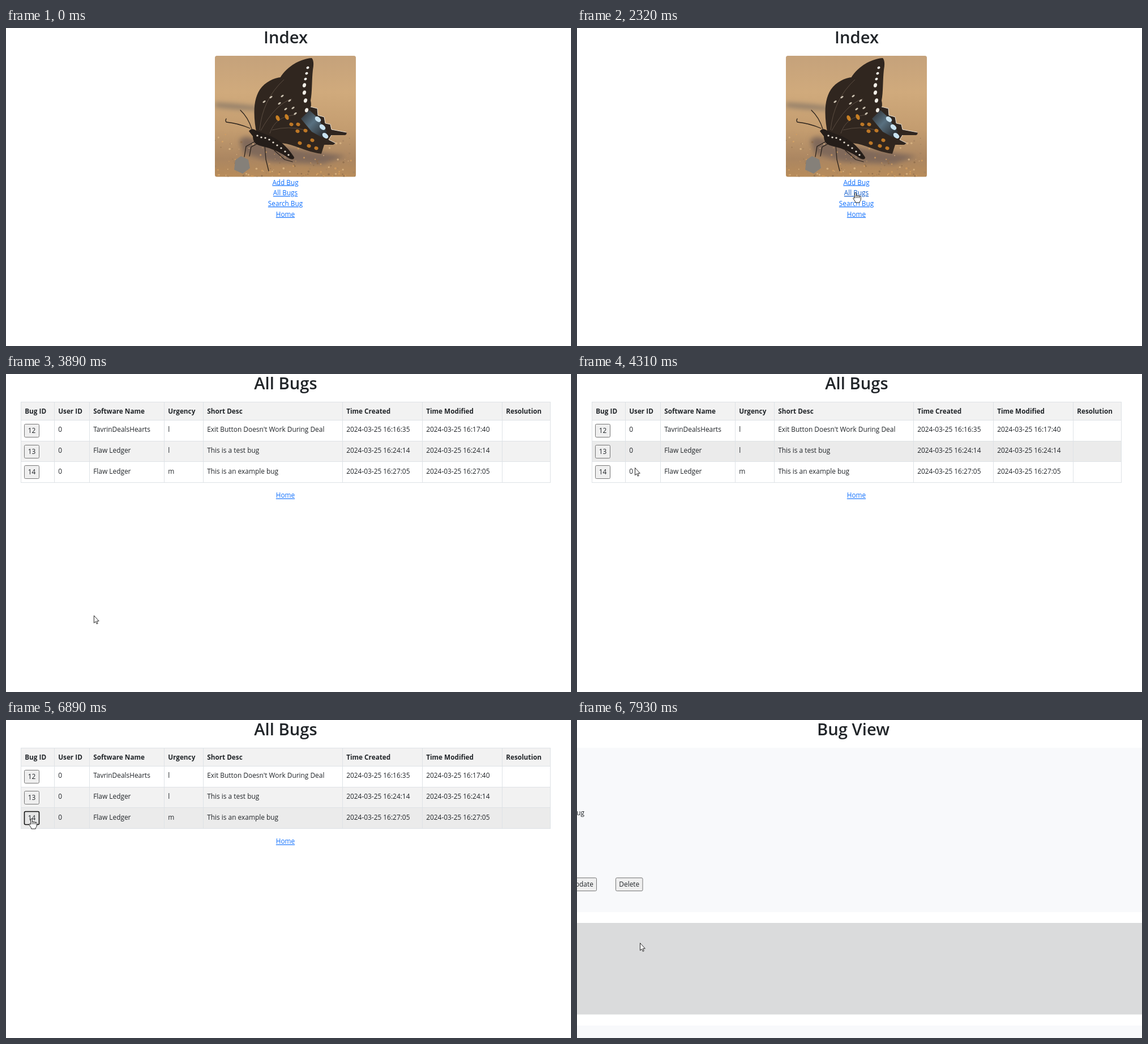
An HTML page that plays this animation: 998 px wide and 561 px high, repeating every 8 s.

```html
<!DOCTYPE html>
<html lang="en">
<head>
<meta charset="utf-8">
<title>Bug list</title>
<style>
html, body { margin: 0; width: 100%; height: 100%; overflow: hidden; background: #fff; }
svg { display: block; width: 100%; height: 100%; }
text { font: 11.9px "Open Sans", "Noto Sans", sans-serif; fill: #212529; }
.h1 { font-size: 29.2px; font-weight: 600; text-anchor: middle; }
.th { font-size: 11.75px; font-weight: 700; }
.mid { text-anchor: middle; }
.end { text-anchor: end; }
.link { font-size: 11.75px; text-anchor: middle; fill: #0d6efd; text-decoration: underline; }
.link.over { fill: #0a58ca; }
.btn { fill: #efefef; stroke: #767676; }
.btn.over { fill: #e5e5e5; stroke: #4f4f4f; }
.btn.down { stroke: #101010; stroke-width: 1.6; }
.cursor path { fill: #fff; stroke: #111; stroke-width: .9; stroke-linejoin: round; }
.wing { fill: #30261f; }
</style>
</head>
<body>
<svg id="stage" viewBox="0 0 998 561">
  <defs>
    <linearGradient id="sand" x2="0" y2="1">
      <stop offset="0" stop-color="#c5a27b"/>
      <stop offset=".3" stop-color="#d0aa7c"/>
      <stop offset=".62" stop-color="#c39c6f"/>
      <stop offset=".85" stop-color="#ab8661"/>
      <stop offset="1" stop-color="#b88c5a"/>
    </linearGradient>
    <linearGradient id="blue" x2="1" y2="1">
      <stop offset="0" stop-color="#2b2a2b"/>
      <stop offset=".45" stop-color="#587080"/>
      <stop offset="1" stop-color="#201d1d"/>
    </linearGradient>
    <clipPath id="frame"><rect x="369" y="49" width="249" height="213.5" rx="3.5"/></clipPath>
    <filter id="soft" x="-30%" y="-60%" width="160%" height="220%"><feGaussianBlur stdDeviation="4"/></filter>
  </defs>

  <g class="page" id="index">
    <g clip-path="url(#frame)">
      <rect x="369" y="49" width="249" height="214" fill="url(#sand)"/>
      <g filter="url(#soft)">
        <path d="M369 132Q410 134 445 139V145Q400 143 369 139Z" fill="#8c7a68"/>
        <path d="M412 198Q425 185 445 200L520 215 600 226 560 240 470 236 420 222Z" fill="#80695a"/>
      </g>
      <g id="grains"></g>
      <path d="M403 250L405 233 415 226 428 232 431 247 418 257Z" fill="#858079"/>
      <g fill="none" stroke="#2a221c" stroke-width="1.3" stroke-linecap="round">
        <path d="M434 178Q428 158 414 145M431 177Q410 168 389 166Q387 163 389 160"/>
        <path d="M440 200L424 209 421 227M444 204L433 210 430 226M457 206L459 232 464 252M474 216L492 232 506 236"/>
      </g>
      <path class="wing" d="M484 88C497 66 522 54 540 53Q545 58 542 74C540 92 541 114 538 128Q541 140 534 152L508 160Z"/>
      <path class="wing" d="M443 188C436 154 436 122 452 104C466 89 484 85 497 87C503 112 513 140 522 158L500 180 466 196Z" fill="#3a2f27"/>
      <path class="wing" d="M458 186C466 162 490 148 516 152L538 139 550 142 551 154 562 157 564 168 573 170 575 179 601 184Q603 187 599 189L575 189 570 197 582 203 578 206 562 206 557 222C530 219 505 203 484 203Z"/>
      <path d="M521 160L536 145 548 156 567 183 560 194 540 183Z" fill="url(#blue)"/>
      <path d="M538 139L550 142 551 154 562 157 564 168 573 170 575 179 601 184M575 189L570 197 582 203" fill="none" stroke="#e9e0d3" stroke-width="1"/>
      <path d="M466 186Q475 156 512 153M470 180Q500 172 528 180M448 180Q453 126 491 91M450 181Q476 134 505 125" fill="none" stroke="#65564a" stroke-width=".8"/>
      <path d="M429 182Q434 175 442 181L460 188Q489 197 509 228Q509 234 500 230Q478 214 450 208Q436 205 436 191Z" fill="#241d19"/>
      <g id="spots"></g>
    </g>
  </g>
  <g class="page" id="list"></g>
  <g class="page" id="view">
    <path d="M0 49H998V339H0ZM0 539H998V561H0Z" fill="#f8f9fb"/>
    <path d="M0 358H998V519.5H0Z" fill="#dadbdc"/>
  </g>
  <g class="cursor" id="cursor">
    <path id="arrow" d="M.5 .5V13.6L3.4 10.9 5.3 15.2 7.2 14.4 5.4 10.2H9.3Z"/>
    <path id="hand" d="M-1.5 10.3V1.5Q-1.5.4-.2.4T1.1 1.6V6Q1.2 5 2.5 5T3.9 6.4Q4.1 5.6 5.3 5.6T6.6 7Q6.9 6.4 8 6.4T9.3 7.8V12Q9.3 15 7.3 16.4V18H-.3V16.5L-3.5 11.8Q-4.6 9.8-3.5 9.2-2.6 8.8-1.5 10.3ZM1.1 6V10M3.9 6.4V10M6.6 7V10"/>
  </g>
</svg>
<script>
const $ = id => document.getElementById(id);
const add = (parent, tag, attrs, text = '') => {
  const el = document.createElementNS('http://www.w3.org/2000/svg', tag);
  for (const k in attrs) el.setAttribute(k, attrs[k]);
  el.textContent = text;
  return $(parent).appendChild(el);
};
const label = (page, x, y, text, cls = '') => add(page, 'text', { x, y, class: cls }, text);

// Areas that turn the pointer into a hand: [page, x0, y0, x1, y1, element]
const hot = [];
const link = (page, n, y, half, text) =>
  hot.push([n, 493.5 - half, y - 12, 493.5 + half, y + 4, label(page, 493.5, y, text, 'link')]);
const button = (page, n, x, y, w, h, text) => {
  const el = add(page, 'rect', { x, y, width: w, height: h, rx: 2, class: 'btn' });
  label(page, x + w / 2, y + h / 2 + 4.4, text, 'mid');
  hot.push([n, x, y, x + w, y + h, el]);
  return el;
};

label('index', 494, 27, 'Index', 'h1');
link('index', 0, 276.5, 24, 'Add Bug');
link('index', 0, 295.3, 23, 'All Bugs');
link('index', 0, 314, 31, 'Search Bug');
link('index', 0, 332.7, 17, 'Home');

// Photo details
let seed = 7;
const rnd = () => (seed = seed * 16807 % 2147483647) / 2147483647;
for (let i = 0; i < 170; i++) {
  const y = 262 - 75 * rnd() ** 2;
  add('grains', 'circle', { cx: 369 + 249 * rnd(), cy: y, r: .6 + rnd() * 1.3,
    fill: ['#dfba87', '#8d6b4a', '#d6a060', '#a5835f'][i % 4], opacity: .75 });
}
const spots = (fill, rx, ry, turn, pts) => pts.forEach(([x, y]) =>
  add('spots', 'ellipse', { rx, ry, fill, transform: `translate(${x} ${y}) rotate(${turn})` }));
spots('#f1eee7', 3, 3.8, 15, [[527, 101], [527, 114], [529, 128], [531, 145]]);
spots('#f1eee7', 2.6, 2.1, -20, [[533, 70], [531, 80], [529, 90]]);
spots('#c9bfae', 3, 1.4, -35, [[456, 130], [468, 122], [483, 133], [488, 120], [501, 128], [507, 141], [494, 143], [511, 151]]);
spots('#c77f24', 3.2, 5.2, -25, [[480, 159], [496, 157]]);
spots('#bd7726', 3.6, 3, 25, [[504, 170], [516, 170], [515, 182], [529, 181], [519, 203], [535, 208], [548, 212], [541, 198]]);
spots('#c8e2f0', 6, 4, 40, [[551, 161], [559, 175], [564, 190]]);
spots('#e5ddd0', 1.7, 1.4, 0, [[444, 190], [451, 193], [458, 194], [465, 197], [472, 202], [479, 207], [486, 212], [493, 218], [499, 224]]);

// Table
const cols = [26, 85, 147, 279, 348, 594, 735, 876, 961];
const lines = [49, 81, 118, 154, 191];
const data = [
  ['Bug ID', 'User ID', 'Software Name', 'Urgency', 'Short Desc', 'Time Created', 'Time Modified', 'Resolution'],
  ['12', '0', 'TavrinDealsHearts', 'l', "Exit Button Doesn't Work During Deal", '2024-03-25 16:16:35', '2024-03-25 16:17:40'],
  ['13', '0', 'Flaw Ledger', 'l', 'This is a test bug', '2024-03-25 16:24:14', '2024-03-25 16:24:14'],
  ['14', '0', 'Flaw Ledger', 'm', 'This is an example bug', '2024-03-25 16:27:05', '2024-03-25 16:27:05']
];
const base = ['#f2f2f2', '#ffffff', '#f2f2f2', '#ffffff'];
const rows = base.map((fill, i) =>
  add('list', 'rect', { x: 26, y: lines[i], width: 935, height: lines[i + 1] - lines[i], fill }));
cols.forEach(x => add('list', 'rect', { x, y: 49, width: 1, height: 143, fill: '#dee2e6' }));
lines.forEach(y => add('list', 'rect', { x: 26, y, width: 936, height: 1, fill: '#dee2e6' }));
label('list', 494, 27, 'All Bugs', 'h1');
let open;
data.forEach((row, r) => row.forEach((text, c) => {
  if (r && !c) open = button('list', 1, 32.5, [0, 88.5, 125.5, 161.5][r], 26, 23, text);
  else label('list', cols[c] + 7.2, [70, 102.3, 139, 175.5][r], text, r ? '' : 'th');
}));
link('list', 1, 218.4, 17, 'Home');

label('view', 488, 27, 'Bug View', 'h1');
label('view', 13, 167.5, 'This is an example bug', 'end');
button('view', 2, -17.5, 278.5, 52, 23, 'Update');
button('view', 2, 68.5, 278.5, 47.5, 23, 'Delete');

// Pointer moves: [time, x, y] points; the pointer rests between moves
const moves = [
  [[190, 825, 539], [400, 600, 440], [600, 440, 370], [680, 421, 358], [880, 488, 291]],
  [[1070, 488, 291], [1210, 440, 360], [1350, 416, 408], [1490, 456, 413], [1690, 515, 350], [1760, 519, 325], [1900, 512, 310]],
  [[1900, 512, 310], [2040, 500, 308], [2320, 492, 290]],
  [[3190, 492, 290], [3400, 420, 160], [3540, 300, 135], [3700, 190, 400], [3820, 165, 511], [4030, 143, 240]],
  [[4030, 143, 240], [4170, 98, 150], [4240, 80, 137], [4310, 102, 165], [4520, 150, 245], [4850, 240, 240]],
  [[4850, 240, 240], [5130, 345, 280], [5340, 260, 292], [5680, 115, 200]],
  [[5680, 115, 200], [5820, 85, 178], [6030, 45, 174]],
  [[7090, 45, 174], [7300, 120, 330], [7440, 300, 470], [7580, 356, 507], [7720, 220, 465], [7930, 111, 393]]
];
const STEP = 70;

const slope = (pts, i, k) => i && i < pts.length - 1
  ? (pts[i + 1][k] - pts[i - 1][k]) / (pts[i + 1][0] - pts[i - 1][0]) : 0;

// Pointer state: the time of its last step and its place then
function pointer(t) {
  const pts = moves.filter(m => m[0][0] <= t).pop();
  if (!pts) return null;
  const start = pts[0][0], end = pts[pts.length - 1][0];
  const q = t >= end ? end : start + Math.floor((t - start) / STEP) * STEP;
  let i = 0;
  while (i < pts.length - 2 && q >= pts[i + 1][0]) i++;
  const a = pts[i], b = pts[i + 1], d = b[0] - a[0], u = (q - a[0]) / d, v = 1 - u;
  const at = k => v * v * (1 + 2 * u) * a[k] + u * u * (3 - 2 * u) * b[k]
    + d * u * v * (v * slope(pts, i, k) - u * slope(pts, i + 1, k));
  return { q, x: at(1), y: at(2) };
}

const pageAt = t => t < 2850 ? 0 : t < 6960 ? 1 : 2;
const pages = document.querySelectorAll('.page');
const show = (el, on) => el.style.display = on ? '' : 'none';

function draw() {
  const t = performance.now() % 8000;
  const page = pageAt(t), p = pointer(t);
  pages.forEach((el, i) => show(el, i === page));
  show($('cursor'), p);
  let over = false;
  hot.forEach(([n, x0, y0, x1, y1, el]) => {
    const on = !!p && n === pageAt(p.q) && p.x >= x0 && p.x <= x1 && p.y >= y0 && p.y <= y1;
    el.classList.toggle('over', on);
    over = over || on;
  });
  open.classList.toggle('down', t >= 6820 && page === 1);
  if (p) $('cursor').setAttribute('transform', `translate(${p.x.toFixed(1)} ${p.y.toFixed(1)})`);
  show($('hand'), over);
  show($('arrow'), !over);
  // Row shading trails the pointer by one step
  const late = pointer(t - STEP);
  rows.forEach((el, i) => {
    const on = i && late && late.y >= lines[i] && late.y < lines[i + 1];
    el.setAttribute('fill', on ? '#ebebeb' : base[i]);
  });
  requestAnimationFrame(draw);
}
draw();
</script>
</body>
</html>
```
